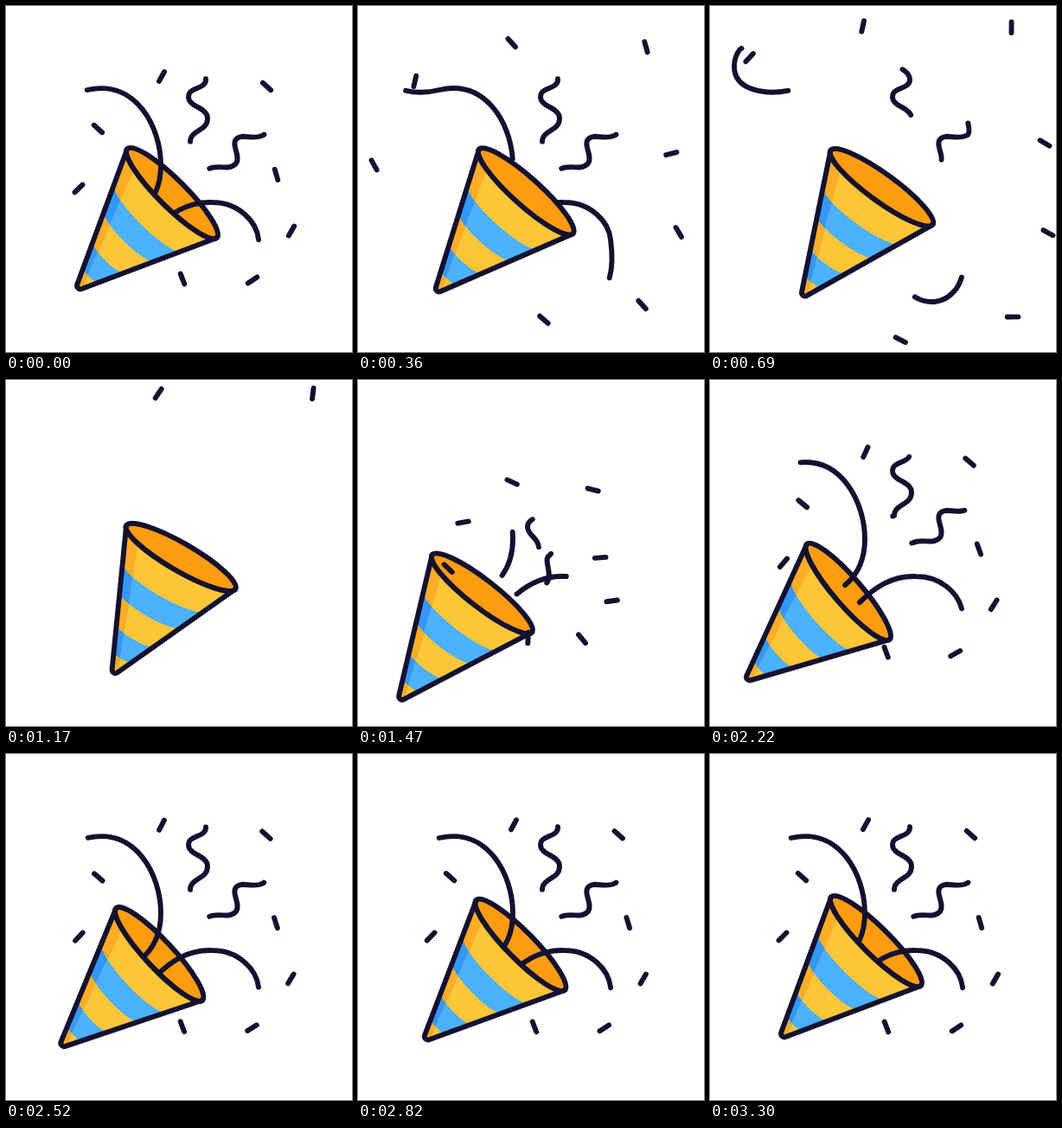
Animation, 400 px wide and 400 px high, one loop 5330 ms. Source, as an HTML page with a canvas:

```html
<!DOCTYPE html>
<html lang="en">
<head>
<meta charset="utf-8">
<title>Party popper</title>
<style>
  html, body { margin: 0; width: 100%; height: 100%; overflow: hidden; background: #fff; }
  canvas { display: block; width: 100vw; height: 100vh; }
</style>
</head>
<body>
<canvas id="stage" width="400" height="400"></canvas>
<script>
const ctx = document.getElementById('stage').getContext('2d');
const LOOP = 5330, STEP = 30, REST_AT = 3300;
const FIRE = 1230, SHOW = 1350;
const INK = '#14112f';
const LIGHT = ['#ffc637', '#4cb1ff'], SHADE = ['#ffad26', '#3298fc'], INSIDE = '#ff9c12';
const RAD = Math.PI / 180;

const clamp = x => Math.min(1, Math.max(0, x));
const mix = (a, b, k) => a + (b - a) * k;
const span = (t, a, b) => clamp((t - a) / (b - a));
const sine = u => (1 - Math.cos(Math.PI * u)) / 2;
const easeOut = (u, n) => 1 - Math.pow(1 - u, n);
const settle = (t, from) => 1 - sine(easeOut(span(t, from, REST_AT), 1.4));

// Cone: winds up by turning, then kicks back and settles.
const RX = 73, RY = 16, TIP = 160, TILT = 44.8;
const WIND = -14.7, KICK = 6.2, RECOIL = 58;

const recoil = t => RECOIL * sine(span(t, FIRE, 1520)) * settle(t, 1520);
const turn = t => t < FIRE
  ? WIND * sine(t / FIRE)
  : mix(WIND, KICK, span(t, FIRE, 1880)) * settle(t, 1800);

function placeCone(t) {
  const m = recoil(t);
  ctx.translate(152 - m, 171 + m * (1.15 - m / 110));
  ctx.rotate(turn(t) * RAD);
  ctx.translate(40, 45.5);
  ctx.rotate(TILT * RAD);
}

function body(k, round) {
  const y = TIP * (1 - k);
  ctx.beginPath();
  ctx.ellipse(0, y, RX * k, RY * k, 0, 0, Math.PI);
  ctx.arcTo(0, TIP, RX * k, y, round);
  ctx.closePath();
}

function stripes(colors) {
  [1, 0.758, 0.565, 0.35, 0.165].forEach((k, i) => {
    body(k, 0);
    ctx.fillStyle = colors[i % 2];
    ctx.fill();
  });
}

function drawMouth(t) {
  ctx.save();
  placeCone(t);
  ctx.beginPath();
  ctx.ellipse(0, 0, RX, RY, 0, 0, 2 * Math.PI);
  ctx.fillStyle = INSIDE;
  ctx.fill();
  ctx.stroke();
  ctx.restore();
}

function drawBody(t) {
  ctx.save();
  placeCone(t);
  ctx.save();
  body(1, 4);
  ctx.clip();
  stripes(LIGHT);
  ctx.beginPath();
  ctx.moveTo(-RX - 2, 0);
  ctx.lineTo(-52, 8);
  ctx.lineTo(4, TIP - 8);
  ctx.lineTo(0, TIP);
  ctx.clip();
  stripes(SHADE);
  ctx.restore();
  body(1, 4);
  ctx.stroke();
  ctx.restore();
}

// Ribbons: a visible window [a, b] sliding along one long path.
function ribbon(enter, main, exit, opts) {
  const len = d => {
    const p = document.createElementNS('http://www.w3.org/2000/svg', 'path');
    p.setAttribute('d', d);
    return p.getTotalLength();
  };
  const all = enter + main + exit;
  return { path: new Path2D(all), a: len(enter), b: len(enter + main), end: len(all), ...opts };
}

const ribbons = [
  ribbon('M155 238', 'C170 226 179 208 179 184C179 140 150 84 94 97',
    'C70 103 28 100 28 70C28 62 31 55 34 51C40 44 54 50 54 63',
    { out: [0, 1200], from: [0.12, 0.05], pow: 2.8 }),
  ribbon('M172 258', 'C190 240 210 226 238 227C270 227 290 250 292 270',
    'C296 300 292 320 282 330C270 344 252 345 238 337C233 334 229 330 226 324',
    { out: [0, 1100], from: [0.15, 0.3], pow: 2.8 }),
  ribbon('M200 222C206 212 210 205 209 194C209 182 196 180 196 170C196 162 205 159 213 157',
    'C213 143 233 145 233 130C233 117 211 117 211 105C211 93 231 97 231 85',
    'C231 80 227 76 222 73C213 68 210 64 209 59',
    { out: [420, 1170], from: [0, 0], pow: 3.6 }),
  ribbon('M195 258C204 252 211 245 216 237C228 226 213 208 221 203C226 199 229 189 235 188',
    'C246 183 258 191 266 182C272 173 259 160 267 153C274 147 286 156 298 149',
    'C301 145 299 139 298 134C296 128 298 122 302 118',
    { out: [420, 1170], from: [0, 0], pow: 3.6 })
];

function drawRibbon(r, t) {
  const [start, stop] = r.out;
  let tail, head;
  if (t < stop) {
    tail = mix(r.a, r.end, sine(span(t, start, stop)));
    head = mix(r.b, r.end, sine(span(t, start, mix(start, stop, 0.82))));
  } else if (t >= SHOW) {
    const k = easeOut(span(t, 1290, 2740), r.pow);
    tail = mix(r.from[0] * r.b, r.a, k);
    head = mix(r.from[1] * r.b, r.b, k);
  } else return;
  if (head < tail) return;
  ctx.setLineDash([Math.max(0.1, head - tail), 2000]);
  ctx.lineDashOffset = -tail;
  ctx.stroke(r.path);
  ctx.setLineDash([]);
}

// Confetti at rest; each bit spins on as it flies away from the cone.
const MOUTH = { x: 172, y: 240 }, CENTER = { x: 190, y: 255 };
const bits = [
  [180, 81.5, -61, 185, 66],
  [301.5, 93, 42, 55, 94],
  [106.5, 142, 42, 103, 116],
  [84, 211, -45, 180, 120],
  [312.5, 195, 74, 155, 94],
  [330, 260, -60, -103, 69],
  [285, 317, -34, -166, 88],
  [204, 315.5, 69, -47, 82]
].map(([x, y, angle, spin, reach]) => ({ x, y, angle, spin, reach, life: 1400 - 2.2 * y }));

function drawBit(b, t) {
  let { x, y, angle } = b;
  if (t < b.life) {
    const k = easeOut(span(t, 0, 1200), 2.5);
    const dir = Math.atan2(y - CENTER.y, x - CENTER.x);
    x += b.reach * k * Math.cos(dir);
    y += b.reach * k * Math.sin(dir);
    angle += b.spin * k;
  } else if (t >= SHOW) {
    const left = Math.exp(-Math.pow((t - 1300) / 95, 0.66));
    x = mix(x, MOUTH.x, left);
    y = mix(y, MOUTH.y, left);
    angle -= 2.2 * b.spin * left;
  } else return;
  const dx = 6.3 * Math.cos(angle * RAD), dy = 6.3 * Math.sin(angle * RAD);
  ctx.beginPath();
  ctx.moveTo(x - dx, y - dy);
  ctx.lineTo(x + dx, y + dy);
  ctx.stroke();
}

function draw(t) {
  ctx.fillStyle = '#fff';
  ctx.fillRect(0, 0, 400, 400);
  ctx.strokeStyle = INK;
  ctx.lineWidth = 5.9;
  ctx.lineCap = ctx.lineJoin = 'round';
  drawMouth(t);
  ribbons.forEach(r => drawRibbon(r, t));
  bits.forEach(b => drawBit(b, t));
  drawBody(t);
}

const start = performance.now();
function tick() {
  const t = (performance.now() - start) % LOOP;
  draw(Math.min(REST_AT, Math.floor(t / STEP) * STEP));
  requestAnimationFrame(tick);
}
tick();
</script>
</body>
</html>
```
